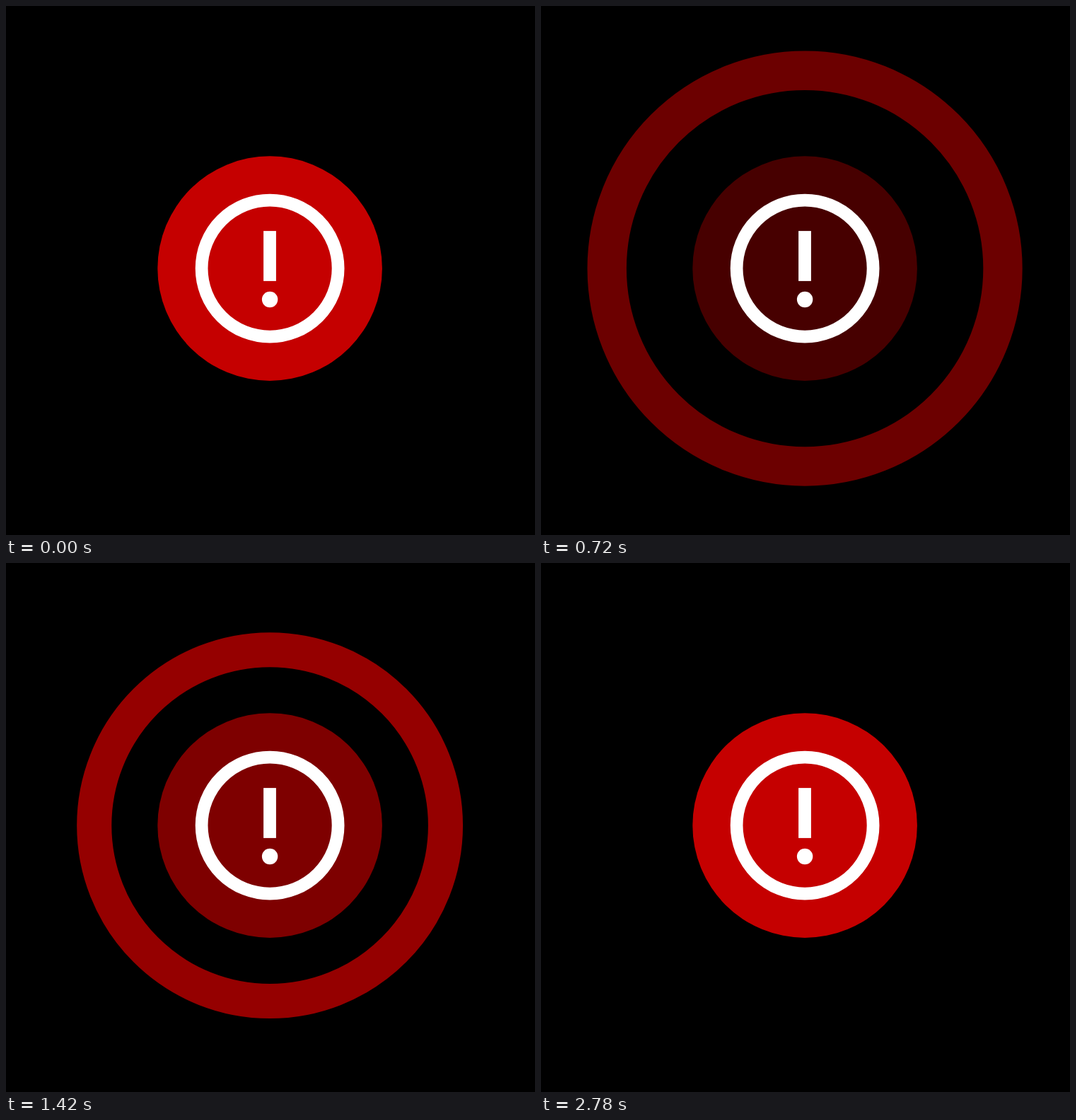
Write an HTML page that moves like this. It is 748 px wide and 748 px high and loops after 2880 ms.

```html
<!DOCTYPE html>
<html lang="en">
<head>
<meta charset="utf-8">
<title>Alert pulse</title>
<style>
  html, body { margin: 0; width: 100%; height: 100%; overflow: hidden; background: #000; }
  svg { display: block; width: 100%; height: 100%; }
</style>
</head>
<body>
<svg viewBox="0 0 748 748">
  <g transform="translate(373.1 371.1)">
    <circle id="disc" r="158.8" fill="#c50000"/>
    <g fill="none" stroke="#c50000">
      <circle class="wave"/>
      <circle class="wave"/>
    </g>
    <circle r="96.5" fill="none" stroke="#fff" stroke-width="17.8"/>
    <rect x="-9" y="-53" width="17.8" height="70.8" fill="#fff"/>
    <circle cy="43.9" r="11.2" fill="#fff"/>
  </g>
</svg>
<script>
const LOOP = 2880;
const WAVE_STARTS = [0, 20.2];
const BURST = 4.8, FADE_END = 29.65;
const disc = document.getElementById('disc');
const waves = document.querySelectorAll('.wave');
const clamp = v => Math.max(0, Math.min(1, v));

// Steps come in an uneven beat: one held for 100 ms, then two of 20 ms.
function stepAt(ms) {
  if (ms < 20) return 0;
  const beat = Math.floor((ms - 20) / 140), rest = (ms - 20) % 140;
  return Math.min(59, 1 + 3 * beat + (rest < 100 ? 0 : rest < 120 ? 1 : 2));
}

// Outer radius: a quick burst, then a quadratic ease-out.
const easeOut = age => 343 - (0.465 * Math.max(0, 28.8 - age)) ** 2;
const waveRadius = age =>
  age < BURST ? easeOut(BURST) * (age / BURST) ** 1.85 : easeOut(age);

function drawWave(wave, age) {
  const visible = age > 0 && age < FADE_END;
  const outer = visible ? waveRadius(age) : 0;
  wave.setAttribute('r', outer * 0.91);
  wave.setAttribute('stroke-width', outer * 0.18);
  wave.setAttribute('opacity', visible ? clamp((FADE_END - age) / (FADE_END - BURST)) : 0);
}

function draw(ms) {
  const step = stepAt(ms);
  disc.setAttribute('opacity', 0.2 + 0.8 * clamp(Math.abs(step - 20) / 20));
  waves.forEach((wave, i) => drawWave(wave, step - WAVE_STARTS[i]));
}

const start = performance.now();
function tick() {
  draw((performance.now() - start) % LOOP);
  requestAnimationFrame(tick);
}
tick();
</script>
</body>
</html>
```
